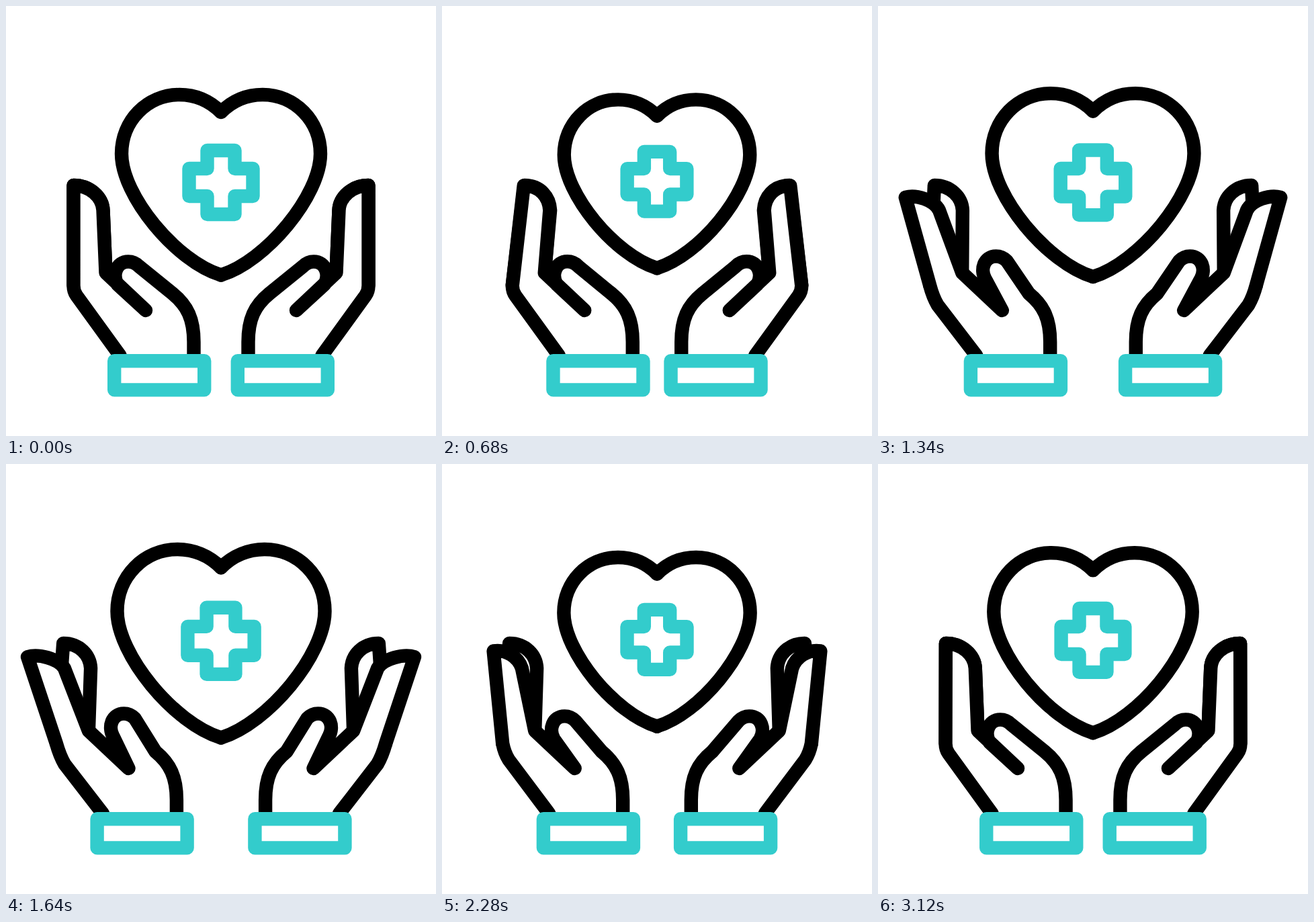
These frames come from a looping animation (640x640 px, 3.2 s). An HTML page:

```html
<!DOCTYPE html>
<html lang="en">
<head>
<meta charset="utf-8">
<title>Caring hands</title>
<style>
  html, body { margin: 0; width: 100%; height: 100%; overflow: hidden; background: #fff; }
  svg { display: block; width: 100%; height: 100%; }
</style>
</head>
<body>
<svg viewBox="0 0 640 640" fill="none" stroke="#000" stroke-width="20.4" stroke-linejoin="round" stroke-linecap="round">
  <defs>
    <g id="hand">
      <path id="back"/>
      <path id="front" fill="#fff"/>
      <rect x="10.2" y="528.2" width="134" height="43.2" fill="#fff" stroke="#33cccc"/>
    </g>
    <path id="half" d="M320 158C303 141 281 132 258 132C210 132 172 171 172 220C172 282 253 380 320 400.5"/>
  </defs>
  <g id="heart">
    <use href="#half"/>
    <use href="#half" transform="translate(640 0) scale(-1 1)"/>
    <path stroke="#33cccc" transform="translate(320 262.5)"
      d="M-20.5-47.5h41v27h27v41h-27v27h-41v-27h-27v-41h27z"/>
  </g>
  <use id="left" href="#hand"/>
  <use id="right" href="#hand"/>
</svg>
<script>
const LOOP = 3200, BEAT = 1600, STROKE = 20.4, HEART_Y = 244;
const $ = id => document.getElementById(id);
const mix = (a, b, k) => a + (b - a) * k;
const smooth = x => x * x * (3 - 2 * x);

// Lean tilts the whole hand inward, spread parts the front fingers from the back one.
const rest = { cuff: 151, lean: 0, spread: 0 };
const poses = [
  { at: 0, ...rest },
  { at: 640, cuff: 155.8, lean: 18, spread: 0 },
  { at: 1120, cuff: 129.3, lean: 4, spread: 0.68 },
  { at: 1600, cuff: 125.7, lean: 10, spread: 1 },
  { at: 1880, cuff: 120.5, lean: 15, spread: 1.22 },
  { at: 2560, cuff: 152.4, lean: 7, spread: 0 },
  { at: LOOP, ...rest }
];

function poseAt(t) {
  const next = poses.findIndex(pose => pose.at > t);
  const a = poses[next - 1], b = poses[next];
  const k = smooth((t - a.at) / (b.at - a.at));
  const part = name => mix(a[name], b[name], k);
  return { cuff: part('cuff'), lean: part('lean'), spread: part('spread') };
}

// Shrinks and grows once per beat; the middle beat peaks higher.
function heartScale(t) {
  const peak = Math.abs(t - BEAT) < BEAT / 2 ? 1.045 : 1;
  return mix(0.93, peak, smooth(Math.abs(1 - (t % BEAT) / (BEAT / 2))));
}

// Fingertip, rounded over to the knuckle, then down to the base of the fingers.
function finger(lean, spread, open) {
  const x = lean - 50.5 - 52.5 * spread, y = 267 + 20 * open;
  const knuckle = 0.7 * lean - 6.5 - 39 * open;
  return `L${x} ${y}C${x + 24 - 9 * open} ${y - 5 * open} ` +
    `${knuckle - 1 - 8 * open} ${284 + 5 * open} ${knuckle} 304L-2.5 397`;
}

function drawHand({ lean, spread }) {
  const open = spread * (1.5 - 0.5 * spread);
  const m = (closed, opened) => mix(closed, opened, open);
  const wrist = `M18.5 520L${m(-46, -38)} ${m(431, 447)}Q${m(-50.5, -45.5)} ${m(425, 434)} -50.5 416`;
  const thumb = `L57 453L${m(15, 34)} ${m(414.5, 405.5)}c-8-14-2-34 16-34c7 0 12 3 16 7`;
  const palm = 'L97 428C119 446 128.5 466 128.5 500V520';
  $('back').setAttribute('d', 'M-50.5 416' + finger(lean, 0, 0));
  $('front').setAttribute('d', wrist + finger(lean, spread, open) + thumb + palm);
}

function draw(t) {
  const scale = heartScale(t), pose = poseAt(t);
  $('heart').setAttribute('transform',
    `translate(320 ${HEART_Y}) scale(${scale}) translate(-320 ${-HEART_Y})`);
  $('heart').setAttribute('stroke-width', STROKE / scale);
  drawHand(pose);
  $('left').setAttribute('transform', `translate(${pose.cuff} 0)`);
  $('right').setAttribute('transform', `translate(${640 - pose.cuff} 0) scale(-1 1)`);
}

function tick() {
  draw(performance.now() % LOOP);
  requestAnimationFrame(tick);
}
tick();
</script>
</body>
</html>
```
